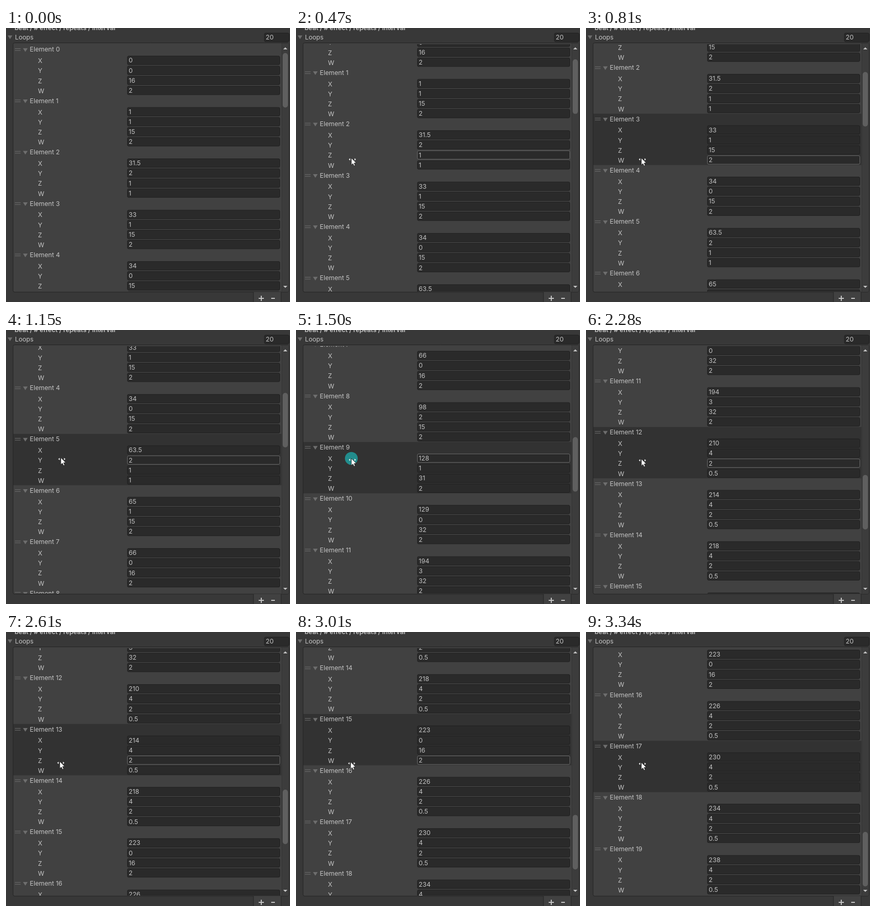
Recreate the animation shown at these times as an HTML page with a canvas. Size 544 by 525 pixels, loop 3.87 s.

```html
<!DOCTYPE html>
<html lang="en">
<head>
<meta charset="utf-8">
<title>Loops list</title>
<style>
  html, body { margin: 0; width: 100%; height: 100%; overflow: hidden; background: #383838; }
  canvas { display: block; }
</style>
</head>
<body>
<canvas id="stage" width="544" height="525"></canvas>
<script>
const ctx = document.getElementById('stage').getContext('2d');

const LOOP = 3870, NOTCH = 54, MAX_SCROLL = 1495.3;
const ROW = 98.4, LINE = 19.2, VIEW_TOP = 31, VIEW_BOTTOM = 505;
const TEXT = '#c4c4c4', DIM = '#6e6e6e', PANEL = '#414141', EDGE = '#242424';

const elements = `0 0 16 2|1 1 15 2|31.5 2 1 1|33 1 15 2|34 0 15 2|63.5 2 1 1|65 1 15 2
|66 0 16 2|98 2 15 2|128 1 31 2|129 0 32 2|194 3 32 2|210 4 2 0.5|214 4 2 0.5|218 4 2 0.5
|223 0 16 2|226 4 2 0.5|230 4 2 0.5|234 4 2 0.5|238 4 2 0.5`
  .split('|').map(row => row.trim().split(' '));

// [time in ms, wheel notches scrolled so far]
const scrollSteps = [
  [0, 0], [190, 0], [340, 1], [600, 2], [810, 3], [950, 4], [1080, 5], [1150, 6],
  [1220, 7], [1290, 9], [1360, 10], [1430, 12], [1500, 13], [1580, 14], [1660, 15],
  [1840, 16], [1930, 16], [2020, 17], [2170, 18], [2230, 18], [2280, 19], [2500, 20],
  [2610, 21], [2680, 22], [2740, 23], [2870, 24], [3010, 25], [3160, 26], [3250, 27], [3340, 28]
];

// [time in ms, x, y] of the pointer tip
const pointerPath = [
  [190, 106, 249], [810, 106, 249], [1150, 105, 244.5], [1500, 106, 246],
  [2020, 108.5, 246], [2610, 103, 248], [3340, 106, 249.8]
];

function pointerAt(t) {
  const i = pointerPath.findIndex(p => p[0] >= t);
  if (i <= 0) return pointerPath.at(i).slice(1);
  const [t0, x0, y0] = pointerPath[i - 1], [t1, x1, y1] = pointerPath[i];
  const k = (t - t0) / (t1 - t0);
  return [x0 + (x1 - x0) * k, y0 + (y1 - y0) * k];
}

function rect(x, y, w, h, color) {
  ctx.fillStyle = color;
  ctx.fillRect(x, y, w, h);
}

function roundRect(x, y, w, h, r, fill, stroke) {
  ctx.beginPath();
  ctx.roundRect(x, y, w, h, r);
  ctx.fillStyle = fill;
  ctx.fill();
  if (!stroke) return;
  ctx.strokeStyle = stroke;
  ctx.lineWidth = 1;
  ctx.stroke();
}

function polygon(points, color) {
  ctx.beginPath();
  points.forEach(([x, y]) => ctx.lineTo(x, y));
  ctx.closePath();
  ctx.fillStyle = color;
  ctx.fill();
}

function triangle(x, y, halfWidth, height, color) {
  polygon([[x - halfWidth, y - height / 2], [x + halfWidth, y - height / 2], [x, y + height / 2]], color);
}

function label(text, x, centerY, weight = 400) {
  ctx.font = `${weight} 12.2px Inter, sans-serif`;
  ctx.fillStyle = TEXT;
  ctx.fillText(text, x, centerY + 4.4);
}

function field(value, x, centerY, w, border = '#202020') {
  roundRect(x + .5, centerY - 8.2, w - 1, 16.4, 2.5, '#2a2a2a', border);
  label(value, x + 3, centerY);
}

function drawElement(n, scroll, pointer, t) {
  const top = VIEW_TOP + n * ROW - scroll;
  if (top > VIEW_BOTTOM || top + ROW < VIEW_TOP) return;
  const y = top + 10, pointerY = pointer ? pointer[1] : -1;
  if (t >= 810 && pointerY >= top && pointerY < top + ROW) {
    rect(14, top, 513.5, ROW, t >= 1930 && t < 2170 ? '#313438' : '#323232');
  }
  rect(17, y - 2, 11, 1, DIM);
  rect(17, y + 1.5, 11, 1, DIM);
  triangle(37, y + 1.2, 4.5, 7, DIM);
  label('Element ' + n, 45.6, y);

  elements[n].forEach((value, i) => {
    const lineY = y + 21 + i * LINE;
    const hovered = Math.abs(pointerY - lineY) < 8.5;
    const focused = n === 9 && i === 0 && t >= 1580;
    label('XYZW'[i], 61.3, lineY + .7);
    field(value, 232, lineY, 293, focused ? '#3a79bb' : hovered ? '#686868' : undefined);
  });
}

function drawScrollbar(scroll) {
  rect(528, 29, 13.5, 476.5, '#3c3c3c');
  rect(528, 29, 1, 476.5, '#343434');
  triangle(535, 39, 4, -4, TEXT);
  triangle(535, 496, 4, 4, TEXT);
  roundRect(530, 48 + scroll * .224, 10, 104.5, 5, '#5f5f5f');
}

function drawPointer([x, y], pressed) {
  if (pressed) {
    ctx.beginPath();
    ctx.arc(x, y, 12.3, 0, Math.PI * 2);
    ctx.fillStyle = '#228d8d';
    ctx.fill();
  }
  for (const [dx, side] of [[-2, -1], [6, 1]]) {
    polygon([[x + dx, y + .5], [x + dx + 3 * side, y + 2.8], [x + dx, y + 5]], '#e8e8e8');
  }
  const arrow = [[0, 0], [0, 13.5], [3, 10.8], [5.2, 15.3], [7.4, 14.2], [5.3, 9.9], [9.4, 9.6]]
    .map(([dx, dy]) => [x + dx, y + dy]);
  polygon(arrow, '#fff');
  ctx.strokeStyle = '#1a1a1a';
  ctx.lineWidth = .8;
  ctx.stroke();
}

function drawFrame() {
  rect(0, 0, 544, 525, '#383838');
  label('beat / # effect / repeats / interval', 16.5, 0, 600);
  triangle(7.7, 17.8, 4.5, 7, DIM);
  label('Loops', 17.3, 17.2);
  field('20', 494.5, 18, 48.5);
}

function drawFooter() {
  rect(474, 506, 53, 19, PANEL);
  rect(473.5, 506, 1, 19, EDGE);
  rect(526.5, 506, 1, 19, EDGE);
  rect(484, 517, 10, 2, TEXT);
  rect(488, 513, 2, 10, TEXT);
  rect(508, 517, 7, 2, TEXT);
}

function render() {
  const now = performance.now() % LOOP;
  const [t, notches] = scrollSteps.findLast(step => step[0] <= now);
  const scroll = Math.min(notches * NOTCH, MAX_SCROLL);
  const pointer = t >= 190 ? pointerAt(t) : null;

  drawFrame();
  roundRect(13.5, 28.5, 528.5, 477.5, 3, PANEL, EDGE);
  ctx.save();
  ctx.beginPath();
  ctx.rect(14, VIEW_TOP, 514, VIEW_BOTTOM - VIEW_TOP);
  ctx.clip();
  elements.forEach((_, n) => drawElement(n, scroll, pointer, t));
  ctx.restore();
  drawScrollbar(scroll);
  drawFooter();
  if (pointer) drawPointer(pointer, t >= 1430 && t < 2230);
  requestAnimationFrame(render);
}
render();
</script>
</body>
</html>
```
